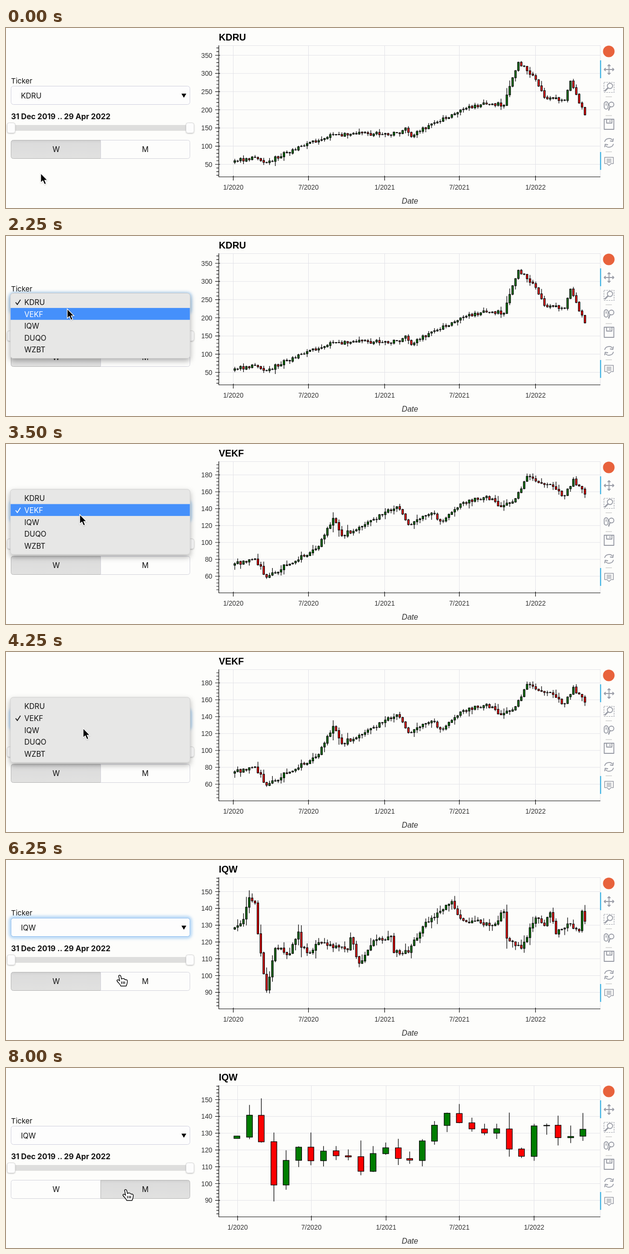
An HTML page that plays this animation: 1280x373 px, repeating every 8.12 s.

```html
<!DOCTYPE html>
<html lang="en">
<head>
<meta charset="utf-8">
<title>Candlestick explorer</title>
<style>
html, body { margin: 0; width: 100%; height: 100%; overflow: hidden; background: #fdfdfb; }
svg { display: block; width: 100vw; height: 100vh; }
.ui { font: 15.3px Inter, sans-serif; fill: #111; }
.axis { font: 13.75px "Liberation Sans", Arial, sans-serif; fill: #333; }
.title { font: bold 19.5px "Liberation Sans", Arial, sans-serif; fill: #000; }
.axis-name { font: italic 16px "Liberation Sans", Arial, sans-serif; fill: #333; }
.grid { stroke: #e3e3e8; fill: none; }
.tick { stroke: #111; stroke-width: 1.2; fill: none; }
.candle { stroke: #000; stroke-width: 1.25; }
.up { fill: #007d00; }
.down { fill: #fe0000; }
.icon { stroke: #999ca6; stroke-width: 1.8; fill: none; stroke-linejoin: round; }
.mid { text-anchor: middle; }
.end { text-anchor: end; }
</style>
</head>
<body>
<svg id="stage" viewBox="0 0 1280 373">
  <defs>
    <linearGradient id="pressed" x2="0" y2="1">
      <stop offset="0" stop-color="#cfcfcf"/><stop offset=".16" stop-color="#dcdcdc"/><stop offset="1" stop-color="#e1e1e0"/>
    </linearGradient>
    <filter id="shadow" x="-20%" y="-20%" width="140%" height="160%">
      <feDropShadow dx="0" dy="5" stdDeviation="6" flood-opacity=".3"/>
    </filter>
    <filter id="soft" x="-40%" y="-40%" width="180%" height="180%">
      <feDropShadow dx="0" dy="1" stdDeviation="1.2" flood-opacity=".22"/>
    </filter>
    <filter id="blur" x="-5%" y="-40%" width="110%" height="180%"><feGaussianBlur stdDeviation="3"/></filter>
  </defs>

  <g id="charts"></g>

  <g id="toolbar">
    <circle cx="1250.5" cy="48.5" r="12" fill="#e8623c"/>
    <path d="M1233.5 67v37m0 153v37" stroke="#26aae1" stroke-width="2"/>
    <path d="M1244 142.5h13m-13 39h13m-13 75h13" stroke="#cfcfcf" stroke-width="1.5"/>
    <g class="icon">
      <path d="M1242 86h18m-9-9v18m-3-16l3-3 3 3m-6 14l3 3 3-3m-10-10l-3 3 3 3m14-6l3 3-3 3"/>
      <rect x="1240.5" y="112.5" width="21" height="21" stroke-width="1.2" stroke-dasharray="3 2"/>
      <circle cx="1253" cy="120" r="5.5"/><path d="M1249 124l-7 7" stroke-width="3"/>
      <rect x="1241" y="153" width="8" height="15" rx="4"/><path d="M1245 156v5"/>
      <circle cx="1256" cy="158.5" r="5"/><path d="M1253 163l-3 8" stroke-width="2.5"/>
      <path d="M1241 189h20v21h-20zm5 0v8h11v-8m-4 2v4"/>
      <path d="M1242 236a9 8 0 0 1 16-4m2 8a9 8 0 0 1-16 4m16-15l-1 6-6-1m-11 13l1-6 6 1"/>
      <path d="M1242 268h18v13h-5l-4 4-4-4h-5zm4 4h10m-10 3h10m-10 3h10" stroke-width="1.5"/>
    </g>
  </g>

  <g class="ui">
    <text x="10.5" y="114.5" style="font-size:15px">Ticker</text>
    <rect id="glow" x="9.5" y="119.5" width="373" height="40" rx="6" fill="none" stroke="#7db9f2" stroke-width="4" filter="url(#blur)"/>
    <rect id="select" x="10.5" y="120.5" width="371" height="38" rx="5" fill="#fdfdfd"/>
    <text id="choice" x="31" y="145.5"></text>
    <path d="M364 136h10l-5 8.5z" fill="#000"/>
    <text x="10.5" y="189" style="font-size:15.8px;font-weight:700">31 Dec 2019 .. 29 Apr 2022</text>
    <rect x="10" y="201" width="372" height="12" rx="3" fill="#dededd"/>
    <g fill="#fdfdfd" stroke="#d6d6d6" filter="url(#soft)">
      <rect x="2.5" y="196.5" width="16.5" height="21" rx="4"/>
      <rect x="373.5" y="196.5" width="16.5" height="21" rx="4"/>
    </g>
    <path id="weekly" d="M196.5 232.5H15.5q-5 0-5 5v28q0 5 5 5H196.5z"/>
    <path id="monthly" d="M196.5 232.5H376.5q5 0 5 5v28q0 5-5 5H196.5z"/>
    <text class="mid" x="104" y="257">W</text>
    <text class="mid" x="289" y="257">M</text>
  </g>

  <g id="menu" class="ui">
    <rect x="9" width="373" height="135" rx="6" fill="#e7e7e6" stroke="#c4c4c4" stroke-width=".8" filter="url(#shadow)"/>
    <rect id="highlight" x="9.5" width="372" height="24.6" fill="#4590fb"/>
    <path id="check" d="M20-5l3.5 4.5 6.5-10" fill="none" stroke-width="1.7"/>
  </g>

  <path id="arrow" d="M0 0v19.5l4.5-4 3.3 7.5 3.5-1.5-3.1-7.2H14z" fill="#000" stroke="#fff" stroke-width="1.3" filter="url(#soft)"/>
  <path id="hand" d="M4 2c1-2 4-1 4.5 1l1.5 6c3-2 6-1 7.500 1.500 3-1 4.500.5 4.500 3 0 4-.5 6-2.500 10h-11c-1.500-4-4.500-6-7.500-10-1.500-2 1-4 3-2.500l2 1.500zm6 12v5m3.500-5v5m3-5v5" fill="#fff" stroke="#000" stroke-width="1.4"/>
</svg>

<script>
const LOOP = 8120, STEP = 125, FRAMES = 65, ROW = 24.6, WEEKS = 122, DAY = 864e5;
const NAMES = ['KDRU', 'VEKF', 'IQW', 'DUQO', 'WZBT'];
const $ = id => document.getElementById(id);

function add(parent, tag, attrs, text) {
  const node = document.createElementNS('http://www.w3.org/2000/svg', tag);
  for (const key in attrs) node.setAttribute(key, attrs[key]);
  if (text !== undefined) node.textContent = text;
  parent.append(node);
  return node;
}

function seeded(seed) {
  return () => (seed = (seed * 16807) % 2147483647) / 2147483647;
}

// Flat list of week, height pairs, joined by straight lines.
function along(points, at) {
  let i = 0;
  while (i + 4 < points.length && points[i + 2] <= at) i += 2;
  const [x0, y0, x1, y1] = points.slice(i, i + 4);
  return y0 + (y1 - y0) * (at - x0) / (x1 - x0);
}

const scales = [
  { top: 350, y: 56.5, unit: 50, gap: 37.67 },
  { top: 180, y: 64, unit: 20, gap: 35 },
  { top: 150, y: 65.5, unit: 10, gap: 34.8 },
];

// Turning points of the weekly closing price, as heights on the stage.
const trends = [
  [0,275, 7,268, 11,279, 20,252, 34,221, 46,219, 57,219, 59,207, 61,225, 67,202, 77,175, 86,155,
    93,160, 98,71, 103,98, 107,144, 114,150, 116,110, 121,180],
  [0,248, 7,238, 11,276, 29,212, 34,154, 37,190, 51,147, 56,130, 60,167, 68,143, 72,160, 78,124,
    87,108, 92,130, 97,113, 101,67, 108,84, 114,107, 117,73, 121,104],
  [0,140, 3,123, 5,78, 7,89, 8,153, 11,270, 14,183, 19,194, 22,149, 23,181, 26,193, 29,171,
    39,186, 40,161, 43,214, 48,167, 54,158, 55,192, 60,191, 65,138, 75,86, 78,121, 89,136,
    93,107, 94,162, 99,183, 104,120, 107,136, 109,109, 111,153, 116,132, 119,147, 120,106, 121,127],
];

function weeklyPrices(index) {
  const random = seeded(4711 + index * 97);
  const trend = trends[index];
  const turns = new Set(trend.filter((_, i) => i % 2 === 0));
  const spread = 5 + index * 3;
  let last = trend[1] + 4;
  return Array.from({ length: WEEKS }, (_, week) => {
    const wobble = turns.has(week) ? 0 : (random() - 0.5) * (8 + index);
    const open = last + (random() - 0.5) * 1.6;
    const close = last = along(trend, week) + wobble;
    const reach = () => 1 + random() ** 2 * (spread + Math.abs(close - open) * 0.4);
    return { open, close, high: Math.min(open, close) - reach(), low: Math.max(open, close) + reach() };
  });
}

function monthlyPrices(weeks) {
  const months = [{ open: 146, close: 141, high: 141, low: 146 }];
  weeks.forEach(({ open, close, high, low }, week) => {
    const date = new Date(Date.UTC(2020, 0, 2 + week * 7));
    const slot = (date.getUTCFullYear() - 2020) * 12 + date.getUTCMonth() + 1;
    const month = months[slot] ||= { open, close, high, low };
    month.close = close;
    month.high = Math.min(month.high, high);
    month.low = Math.max(month.low, low);
  });
  return months;
}

function candle(parent, x, width, { open, close, high, low }) {
  add(parent, 'path', { class: 'candle', d: `M${x} ${high}V${low}` });
  add(parent, 'rect', { class: 'candle ' + (close <= open ? 'up' : 'down'), x: x - width / 2,
    y: Math.min(open, close), width, height: Math.max(0.6, Math.abs(close - open)) });
}

function drawCandles(chart, index, monthly) {
  const weeks = weeklyPrices(index);
  if (!monthly) {
    weeks.forEach((price, i) => candle(chart, 474.6 + i * 6.004, 3.4, price));
    return;
  }
  monthlyPrices(weeks).forEach((price, i) => {
    const days = (Date.UTC(2020, i, 0) - Date.UTC(2019, 11, 31)) / DAY;
    candle(chart, 479 + days * 0.8435, 12.2, price);
  });
}

function buildChart(index, monthly) {
  const chart = add($('charts'), 'g', {});
  const { top, y, unit, gap } = scales[index];
  const [origin, perDay] = monthly ? [480, 0.842] : [471.5, 0.8577];
  add(chart, 'text', { class: 'title', x: 441.5, y: 26 }, NAMES[index]);
  add(chart, 'rect', { class: 'grid', x: 441.5, y: 36.5, width: 791.5, height: 272 });
  let ticks = 'M441.5 36V308.5H1233';
  for (let i = 0; i < 5; i++) {
    const days = (Date.UTC(2020, i * 6, 1) - Date.UTC(2020, 0, 1)) / DAY;
    const x = Math.floor(origin + days * perDay) + 0.5;
    add(chart, 'path', { class: 'grid', d: `M${x} 37V308` });
    ticks += `M${x} 306V316`;
    add(chart, 'text', { class: 'axis mid', x, y: 335 }, `${i % 2 ? 7 : 1}/${2020 + (i >> 1)}`);
  }
  for (let i = 0; i < 7; i++) {
    const row = y + i * gap;
    add(chart, 'path', { class: 'grid', d: `M442 ${row}H1233` });
    ticks += `M434 ${row}H444`;
    add(chart, 'text', { class: 'axis end', x: 428, y: row + 5 }, top - i * unit);
  }
  const minor = gap / 5;
  for (let row = y - Math.floor((y - 37) / minor) * minor; row < 308; row += minor) {
    ticks += `M436.5 ${row}H441.5`;
  }
  drawCandles(chart, index, monthly);
  add(chart, 'path', { class: 'tick', d: ticks });
  add(chart, 'text', { class: 'axis-name mid', x: 838, y: 364 }, 'Date');
  return chart;
}

const charts = [buildChart(0), buildChart(1), buildChart(2), buildChart(2, true)];
const rows = NAMES.map((name, i) => add($('menu'), 'text', { x: 38, y: 24.5 + i * ROW }, name));

const moves = [
  { from: 250, to: 1000, x: 115, y: 140 },
  { from: 1500, to: 2000, x: 127, y: 151 },
  { from: 2500, to: 2875, x: 153, y: 146 },
  { from: 3500, to: 3875, x: 160, y: 158 },
  { from: 5500, to: 6375, x: 246, y: 251 },
];

function pointerAt(t) {
  let x = 72, y = 301;
  for (const move of moves) {
    const part = Math.min(1, Math.max(0, (t - move.from) / (move.to - move.from)));
    x += (move.x - x) * part;
    y += (move.y - y) * part;
  }
  return { x, y };
}

const show = (node, on) => { node.style.display = on ? '' : 'none'; };
const between = (t, from, to) => t >= from && t < to;

function paintButton(button, active) {
  button.setAttribute('fill', active ? 'url(#pressed)' : '#fdfdfc');
  button.setAttribute('stroke', active ? '#b5b5b5' : '#d3d3dc');
}

function render(time) {
  const t = Math.floor(time % LOOP / LOOP * FRAMES) * STEP;
  const { x, y } = pointerAt(t);
  const chosen = t < 2625 ? 0 : t < 4375 ? 1 : 2;
  const current = t < 2750 ? 0 : t < 4500 ? 1 : t < 7125 ? 2 : 3;
  charts.forEach((chart, i) => show(chart, i === current));

  const focused = between(t, 1250, 6875);
  show($('glow'), focused);
  $('select').setAttribute('stroke', focused ? '#8abcef' : '#d0d0df');
  $('choice').textContent = NAMES[chosen];
  paintButton($('weekly'), t < 6875);
  paintButton($('monthly'), t >= 6875);

  const open = between(t, 1250, 2625) || between(t, 3375, 4375);
  const blink = t === 2500 || t === 4250;
  const menuY = 118.5 - chosen * ROW;
  const hovered = blink ? -1 : Math.floor((y - menuY - 6) / ROW);
  show($('menu'), open);
  $('menu').setAttribute('transform', `translate(0 ${menuY})`);
  show($('highlight'), hovered >= 0);
  $('highlight').setAttribute('y', 6 + hovered * ROW);
  $('check').setAttribute('transform', `translate(0 ${24 + chosen * ROW})`);
  $('check').setAttribute('stroke', hovered === chosen ? '#fff' : '#111');
  rows.forEach((row, i) => { row.style.fill = i === hovered ? '#fff' : '#111'; });

  const pointing = y > 232 && x > 180;
  show($('arrow'), !pointing);
  show($('hand'), pointing);
  $(pointing ? 'hand' : 'arrow').setAttribute('transform', `translate(${x - (pointing ? 4 : 0)} ${y})`);
}

const begin = performance.now();
function tick() {
  render(performance.now() - begin);
  requestAnimationFrame(tick);
}
tick();
</script>
</body>
</html>
```
